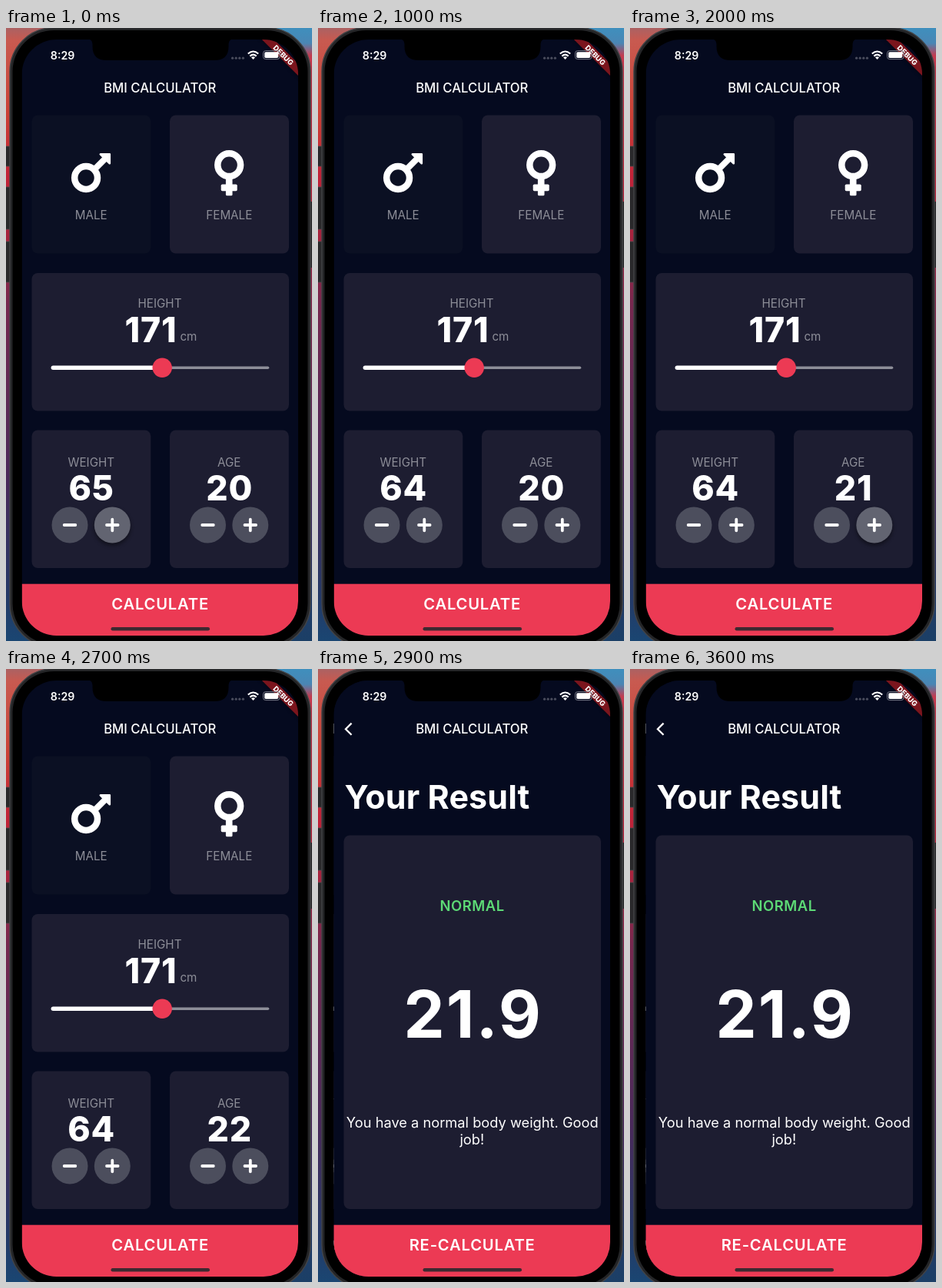
An HTML page for the animation above (3700 ms loop, 398 by 798 pixels).

```html
<!DOCTYPE html>
<html lang="en">
<head>
<meta charset="utf-8">
<title>BMI Calculator</title>
<style>
  html, body { margin: 0; width: 100%; height: 100%; overflow: hidden; background: #000; }
  svg { display: block; width: 398px; height: 798px; }
  text { font-family: Inter, Roboto, sans-serif; fill: #fff; text-anchor: middle; }
  .label { font-size: 15.2px; fill: #8d8e98; }
  .title { font-size: 16.7px; font-weight: 500; }
  .number { font-size: 44.6px; font-weight: 800; letter-spacing: .8px; }
  .action { font-size: 20.2px; font-weight: 600; letter-spacing: .8px; }
  .start { text-anchor: start; }
  .line { fill: none; stroke: #fff; }
</style>
</head>
<body>
<svg id="stage" viewBox="0 0 398 798" xmlns="http://www.w3.org/2000/svg"></svg>
<script>
const LOOP = 3700, STEP = 100;
const RED = '#ec3a54', CARD = '#1d1d31', IDLE = '#0b1023', PAGE = '#050a1f';
const PAGE_LEFT = 20.6, PAGE_WIDTH = 359.4;

const box = (x, y, w, h, r, fill, more = '') =>
  `<rect x="${x}" y="${y}" width="${w}" height="${h}" rx="${r}" fill="${fill}" ${more}/>`;
const label = (x, y, cls, str, more = '') =>
  `<text x="${x}" y="${y}" class="${cls}" ${more}>${str}</text>`;
const gradient = (id, stops, dir = 'x2="0" y2="1"') =>
  `<linearGradient id="${id}" ${dir}>` + stops.map(([at, color, alpha = 1]) =>
    `<stop offset="${at}" stop-color="${color}" stop-opacity="${alpha}"/>`).join('') + '</linearGradient>';

// Round button with a press highlight and a touch ripple
const button = (id, x, plus) => `
  <g transform="translate(${x} 647)">
    <circle id="${id}-shadow" cy="3" r="24" fill="#000" filter="url(#soft)" opacity="0"/>
    <circle r="23.5" fill="#4c4e5d"/>
    <circle id="${id}-glow" r="23.5" fill="#fff" opacity="0"/>
    <circle id="${id}-dot" cx="11" cy="5" r="2.2" fill="#fff" opacity="0"/>
    <path class="line" d="M-7.3 0H7.3${plus ? 'M0 -7.3V7.3' : ''}" stroke-width="3.8" stroke-linecap="round"/>
  </g>`;

const counter = (id, x, name, value) => `
  ${box(x - 77.3, 523.5, 154.8, 179.5, 8, CARD)}
  ${label(x, 570.5, 'label', name)}
  ${label(x + .4, 615, 'number', value, `id="${id}"`)}
  ${button(id + '-minus', x - 27.8, false)}
  ${button(id + '-plus', x + 27.5, true)}`;

const bottomBar = name =>
  box(PAGE_LEFT, 723.7, PAGE_WIDTH, 70, 0, RED) + label(200.6, 756.6, 'action', name);

const male = `
  <g stroke="#fff" fill="none">
    <circle cx="104.1" cy="195" r="14.9" stroke-width="8.5"/>
    <path d="M114.5 184.6L129 170.1" stroke-width="8"/>
    <path d="M122.8 164.3H134.8V176.3Z" fill="#fff" stroke-width="2.6" stroke-linejoin="round"/>
  </g>`;
const female = `
  <circle class="line" cx="290.2" cy="178.2" r="14.9" stroke-width="8.5"/>
  ${box(285.9, 195, 8.6, 23.3, 1.6, '#fff')}
  ${box(279.7, 203.6, 21, 8.6, 1.6, '#fff')}`;

const home = `
  <g id="home">
    ${box(PAGE_LEFT, 15, PAGE_WIDTH, 776, 0, PAGE)}
    ${label(200.3, 84, 'title', 'BMI CALCULATOR')}
    ${box(33.5, 113.5, 154.8, 180, 8, IDLE)}
    ${male}
    ${label(110.7, 249.4, 'label', 'MALE')}
    ${box(213, 113.5, 155, 180, 8, CARD)}
    ${female}
    ${label(290.3, 249.4, 'label', 'FEMALE')}
    ${box(33.5, 319, 334.5, 179.5, 8, CARD)}
    ${label(200, 363.8, 'label', 'HEIGHT')}
    ${label(188.4, 408.5, 'number', '171')}
    ${label(237.4, 407.3, 'label', 'cm')}
    ${box(200, 440.5, 142.3, 3.6, 1.8, '#8d8e98')}
    ${box(58.6, 439.6, 145, 5.4, 2.7, '#fff')}
    <circle cx="203.2" cy="442.3" r="12.7" fill="${RED}"/>
    ${counter('weight', 110.8, 'WEIGHT', 65)}
    ${counter('age', 290.3, 'AGE', 20)}
    ${bottomBar('CALCULATE')}
  </g>`;

const result = `
  <g id="result">
    ${box(PAGE_LEFT - 18, 15, 18, 776, 0, 'url(#edge)')}
    ${box(PAGE_LEFT, 15, PAGE_WIDTH, 776, 0, PAGE)}
    <path class="line" d="M43.6 70.6L36 78.2L43.6 85.8" stroke-width="2.3"/>
    ${label(200.3, 84, 'title', 'BMI CALCULATOR')}
    ${label(34.5, 182, 'start', 'Your Result', 'font-size="43" font-weight="700" letter-spacing=".1"')}
    ${box(33.5, 216.5, 334.5, 486.5, 8, CARD)}
    ${label(200.6, 314.6, '', 'NORMAL', 'font-size="18.4" font-weight="600" letter-spacing=".6" style="fill:#5dda76"')}
    ${label(201.6, 480, '', '21.9', 'font-size="85" font-weight="700" letter-spacing="2"')}
    ${label(200.7, 597, '', 'You have a normal body weight. Good', 'font-size="18.25"')}
    ${label(200.3, 618.6, '', 'job!', 'font-size="18.25"')}
    ${bottomBar('RE-CALCULATE')}
  </g>`;

const banner = `
  <g transform="translate(361 35.2) rotate(45)">
    ${box(-50, -5.6, 100, 11.2, 0, '#000', 'filter="url(#soft)" opacity=".5"')}
    ${box(-50, -5.6, 100, 11.2, 0, '#7b151d')}
    ${label(0, 3.7, '', 'DEBUG', 'font-size="9.4" font-weight="800"')}
  </g>`;

const statusBar = `
  ${label(73.6, 40.6, '', '8:29', 'font-size="14.2" font-weight="600"')}
  ${[0, 1, 2, 3].map(i => `<circle cx="${294.6 + i * 4.6}" cy="39.2" r="1.6" fill="#4a4d5d"/>`).join('')}
  <path class="line" d="M314.8 33.6Q321.5 27.4 328.2 33.6M317.3 36.6Q321.5 32.8 325.7 36.6" stroke-width="2.1"/>
  <path d="M319 38.3Q321.5 36.2 324 38.3L321.5 41Z" fill="#fff"/>
  ${box(334.5, 29.6, 21.5, 11, 3.2, 'none', 'stroke="#777987"')}
  ${box(336.2, 31.2, 18, 7.8, 1.8, '#fff')}
  <path d="M357.4 33.4Q359 35 357.4 36.8Z" fill="#777987"/>`;

const sideButtons = [[154, 26], [207, 55], [278, 53]]
  .map(([y, h]) => box(-2, y, 7.5, h, 1, '#29292b', 'stroke="#4b4a4c" stroke-width=".8"')).join('');

stage.innerHTML = `
  <defs>
    ${gradient('left', [[0, '#ab6263'], [.02, '#c85a50'], [.14, '#cc4136'], [.24, '#c22338'],
      [.35, '#a3243f'], [.45, '#76284f'], [.75, '#482a5b'], [.93, '#243a68'], [1, '#1a4672']])}
    ${gradient('right', [[0, '#3f8fbd'], [.025, '#4a86b4'], [.045, '#c33c50'], [.26, '#bd2b40'],
      [.45, '#8a2a50'], [.75, '#4c2a60'], [.93, '#233c68'], [1, '#1b3f66']])}
    ${gradient('edge', [[0, '#000', 0], [1, '#000', .35]], 'x2="1" y2="0"')}
    <filter id="soft" x="-50%" y="-50%" width="200%" height="200%"><feGaussianBlur stdDeviation="2.5"/></filter>
    <clipPath id="screen"><rect x="${PAGE_LEFT}" y="15" width="${PAGE_WIDTH}" height="776" rx="45"/></clipPath>
  </defs>
  ${box(0, 0, 199, 798, 0, 'url(#left)')}
  ${box(199, 0, 199, 798, 0, 'url(#right)')}
  ${sideButtons}
  ${box(395, 226, 5, 86, 1, '#29292b')}
  ${box(5, -.5, 391, 807, 57, '#242527', 'stroke="#424346" stroke-width="1.4"')}
  ${box(8.5, 3, 384, 800, 54, '#000')}
  <g clip-path="url(#screen)">
    ${home}
    ${result}
    ${banner}
    ${statusBar}
    ${box(136.5, 780, 128.5, 4.4, 2.2, '#3d2930')}
  </g>
  <path d="M106 14Q112.5 15 112.5 21V24Q112.5 42 131 42H271Q289.5 42 289.5 24V21Q289.5 15 296 14Z" fill="#000"/>`;

const el = id => document.getElementById(id);

// Values and page positions hold from their time until the next entry
const weights = [[0, 65], [700, 64]];
const ages = [[0, 20], [1900, 21], [2300, 22]];
const slide = [[0, PAGE_WIDTH], [2800, 10], [2900, 0]];
const presses = { 'weight-plus': [-200], 'weight-minus': [600], 'age-plus': [1800, 2200] };
const glow = [.03, .12, .12, .05];

const held = (table, t) => table.filter(([at]) => at <= t).pop()[1];

function press(id, t) {
  const start = presses[id].filter(at => at <= t).pop();
  const step = start === undefined ? -1 : (t - start) / STEP;
  const light = glow[step] || 0;
  el(id + '-glow').setAttribute('opacity', light);
  el(id + '-shadow').setAttribute('opacity', light > .1 ? .4 : 0);
  el(id + '-dot').setAttribute('opacity', step === 0 ? .16 : 0);
}

function draw(time) {
  const t = Math.floor((time % LOOP) / STEP) * STEP;
  el('weight').textContent = held(weights, t);
  el('age').textContent = held(ages, t);
  Object.keys(presses).forEach(id => press(id, t));

  const x = held(slide, t);
  el('home').setAttribute('transform', `translate(${(x - PAGE_WIDTH) / 3} 0)`);
  el('result').setAttribute('transform', `translate(${x} 0)`);
  el('result').setAttribute('visibility', x < PAGE_WIDTH ? 'visible' : 'hidden');
}

const origin = performance.now();
function tick() {
  draw(performance.now() - origin);
  requestAnimationFrame(tick);
}
tick();
</script>
</body>
</html>
```
